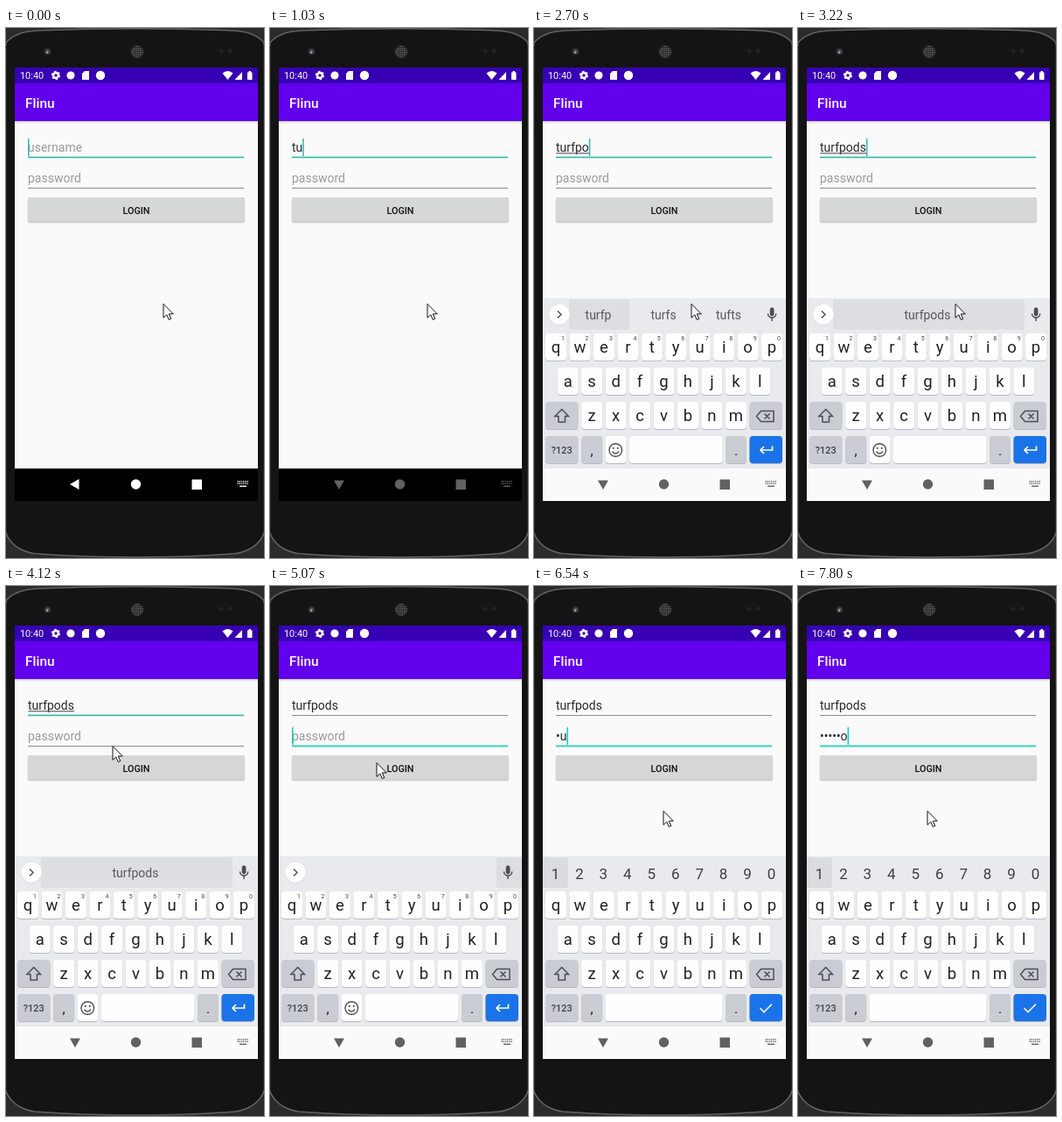
An HTML page for the animation above (8000 ms loop, 295x604 px).

```html
<!DOCTYPE html>
<html lang="en">
<head>
<meta charset="utf-8">
<title>Login form</title>
<style>
  html, body { margin: 0; width: 100%; height: 100%; overflow: hidden; background: #2b2b2b; }
  svg { display: block; width: 100vw; height: 100vh; font-family: Roboto, sans-serif; }
</style>
</head>
<body>
<svg viewBox="0 0 295 604"><g id="phone"></g><g id="screen"></g></svg>
<script>
const LOOP = 8000, NAME = 'turfpods';
const PITCH = 27.45, KEY = '#fefefe', SIDE = '#c9cdd3', ICON = '#4c5055', INK = '#202124';
const measure = document.createElement('canvas').getContext('2d');
measure.font = '14px Roboto, sans-serif';
const widthOf = s => measure.measureText(s).width;

const rect = (x, y, w, h, fill, r = 0) =>
  `<rect x="${x}" y="${y}" width="${w}" height="${h}" rx="${r}" fill="${fill}"/>`;
const circle = (x, y, r, fill, extra = '') =>
  `<circle cx="${x}" cy="${y}" r="${r}" fill="${fill}" ${extra}/>`;
const fillPath = (d, fill) => `<path d="${d}" fill="${fill}"/>`;
const line = (d, color = ICON, w = 1.5) =>
  `<path d="${d}" fill="none" stroke="${color}" stroke-width="${w}"/>`;
const text = (x, y, s, size, fill = INK, extra = '') =>
  `<text x="${x}" y="${y}" font-size="${size}" fill="${fill}" ${extra}>${s}</text>`;
const centered = (x, y, s, size, fill, weight = 400) =>
  text(x, y, s, size, fill, `text-anchor="middle" font-weight="${weight}"`);
const gear = (x, y, r, color) =>
  circle(x, y, r * .58, 'none', `stroke="${color}" stroke-width="${r * .5}"`) +
  circle(x, y, r * .88, 'none', `stroke="${color}" stroke-width="${r * .3}" stroke-dasharray="${r * .46}"`);

// Value of the last [time, value] pair already reached.
const at = (t, steps) => steps.reduce((v, [time, next]) => t >= time ? next : v, steps[0][1]);

function phone() {
  let mesh = '';
  for (let y = -6; y <= 6; y += 2.4)
    for (let x = -6; x <= 6; x += 2.4)
      if (x * x + y * y < 44) mesh += circle(150 + x, 27 + y, .75, '#6a6a6a');
  return `<path d="M0 17Q9 5 34 3Q90 .8 148 .8Q206 .8 261 3Q286 5 295 17V576Q287 595 262 599Q210 603 148 603Q85 603 33 599Q8 595 0 576Z"
      fill="#141414" stroke="#626262" stroke-width="1.6"/>` +
    line('M.5 20V574M294.5 20V574', '#262626', 1) +
    circle(47.5, 27, 4, '#2c2e31') + circle(47.5, 27, 2.2, '#565b63') + circle(47, 28, 1, '#b4bac6') +
    circle(150, 27, 7.4, '#2b2b2b') + mesh +
    circle(246, 26, 2.6, '#202020') + circle(256, 26, 2.6, '#202020') +
    rect(10, 45, 278, 18.5, '#3700b3') + rect(10, 63, 278, 43, '#6200ee') +
    text(16, 58, '10:40', 10.9, '#fff') +
    gear(57, 54, 5, '#fff') + circle(74, 54, 4.6, '#fff') +
    fillPath('M90 49H95V59H87V52Z', '#fff') + circle(108, 54, 5.2, '#fff') +
    fillPath('M247.5 51.5Q253.500 46.500 259.500 51.500L253.500 59Z', '#fff') +
    fillPath('M270 50V59H261.500Z', '#fff') +
    fillPath('M276 50.500H277.500V49H280V50.500H281.500V59H276Z', '#fff') +
    text(22, 91, 'Flinu', 15.5, '#fff', 'font-weight="500"');
}

function field(y, value, hint, focused, caret, accent, underline) {
  const end = 25 + widthOf(value);
  return text(25, y + 15, value || hint, 14, value ? '#2a2a2a' : '#9b9b9b') +
    (underline ? rect(25.5, y + 16.3, end - 25.5, 1, '#444') : '') +
    (caret ? rect(end, y, 1.5, 20, accent) : '') +
    (focused ? rect(25, y + 20.6, 247, 1.6, accent) : rect(25, y + 21, 247, 1, '#8d8d8d'));
}

function form(t) {
  const name = NAME.slice(0, at(t, [[0, 0], [150, 1], [1030, 2], [1280, 4], [2020, 5], [2460, 6], [2960, 7], [3220, 8]]));
  const count = at(t, [[0, 0], [5710, 1], [6540, 2], [6910, 3], [7050, 4], [7420, 5], [7800, 6]]);
  const pass = count ? '•'.repeat(count - 1) + NAME[count - 1] : '';
  const second = t >= 4660;
  const caret = at(t, [[0, 1], [640, 0], [880, 1], [3730, 0], [4260, 1], [5200, 0], [5710, 1], [6390, 0], [6540, 1]]);
  return rect(10, 106, 278, 396, '#fafafa') +
    rect(10, 106, 278, 1, '#cfcfcf') + rect(10, 107, 278, 1, '#e6e6e6') + rect(10, 108, 278, 1, '#f2f2f2') +
    field(126, name, 'username', !second, caret && !second, '#2fb9ae', t >= 1710 && !second) +
    field(161, pass, 'password', second, caret && second, '#03d2c6') +
    rect(24.5, 193.500, 249, 29, '#e2e2e2', 2) + rect(25, 194, 247.500, 27.500, '#c6c7c7', 2) +
    rect(25, 193, 247.500, 27.500, '#d6d7d7', 2) +
    centered(149, 211.500, 'LOGIN', 10.8, '#111', 500);
}

function navBar(t) {
  const color = at(t, [[0, '#fff'], [640, '#cacaca'], [760, '#969696'], [880, '#616161']]);
  const turn = at(t, [[0, 0], [150, -45], [270, -90]]);
  let dots = '';
  for (let i = 0; i < 12; i++)
    dots += rect(264.500 + i % 6 * 2.2, 516 + (i / 6 | 0) * 2.4, 1.3, 1.4, color);
  return rect(10, 502, 278, 37, t < 1280 ? '#000' : '#fafafa') +
    `<path d="M73 520L83.500 514V526Z" fill="${color}" transform="rotate(${turn} 79 520)"/>` +
    circle(148.500, 520, 5.7, color) + rect(212.500, 514.500, 11.500, 11.500, color, .6) +
    dots + rect(267, 521.500, 8, 1.4, color);
}

const key = (x, y, w, fill = KEY) => rect(x, y + 1, w, 31, '#b6b9be', 4) + rect(x, y, w, 31, fill, 4);
const keyRow = (letters, x, y) => [...letters].map((c, i) =>
  key(x + i * PITCH, y, 24) + centered(x + 12 + i * PITCH, y + 22, c, 18.5)).join('');
const digits = (x, y, size, color) => [...'1234567890'].map((c, i) =>
  centered(x + i * PITCH, y, c, size, color)).join('');

const mic = () => rect(269.7, 318.500, 4.8, 10, ICON, 2.4) + line('M267.500 325.500A4.6 4.6 0 0 0 276.700 325.500M272.100 330V334');

function toolbar(opacity) {
  return `<g opacity="${opacity}">` +
    line('M59 322a1.500 1.500 0 0 1 1.500 -1.500H69.500a1.500 1.500 0 0 1 1.500 1.500V328L67 332.500H60.500a1.500 1.500 0 0 1 -1.500 -1.500ZM62 327.500Q64.500 331 67 327.500') +
    circle(62.700, 324.500, 1, ICON) + circle(67.300, 324.500, 1, ICON) +
    centered(104, 330.500, 'GIF', 11, ICON, 900) +
    line('M139 321.500H148.500V333H139ZM141 325.500H146.500M141 328H146.500M141 330.500H145') + rect(141, 319.500, 5.500, 3, ICON) +
    gear(183, 326.500, 6, ICON) + rect(207, 319, 1, 15, '#d2d5d9') +
    [227.500, 232.500, 237.500].map(x => circle(x, 327, 1.600, ICON)).join('') + '</g>';
}

function suggestions(t) {
  const words = at(t, [
    [2580, ['turfp', 'turfs', 'tufts']],
    [2820, ['turfpo', NAME, 'turfs']],
    [3220, ['', NAME, '']],
    [4930, ['', '', '']]]);
  const shade = t >= 4930 ? [259, 29] : t >= 3220 ? [40, 219] : [40, 69];
  return rect(shade[0], 309.500, shade[1], 34.500, '#dcdee1') +
    words.map((w, i) => centered(73.500 + i * 74.500, 332, w, 14, '#55595e')).join('');
}

function strip(t, secret) {
  if (secret) return rect(10, 309.500, 28.500, 34.500, '#dadce0') + digits(24.500, 333.500, 17, '#3b3e43');
  const open = t < 2340;
  return (t < 2580 ? toolbar(at(t, [[0, 1], [2340, .6], [2460, .25]])) : suggestions(t)) +
    circle(29, 327.300, 11.500, '#cfd2d6') + circle(29, 326.500, 11.500, '#fff') +
    line(open ? 'M31 322.500L27 326.500L31 330.500' : 'M27 322.500L31 326.500L27 330.500') + mic();
}

function keyboard(t) {
  if (t < 1280) return '';
  const secret = t >= 5200;
  return rect(10, 308, 278, 194, '#e8eaed') + strip(t, secret) +
    keyRow('qwertyuiop', 13, 348) + keyRow('asdfghjkl', 26.700, 387) + keyRow('zxcvbnm', 54.200, 426) +
    (secret ? '' : digits(33, 356, 7, '#44474b')) +
    key(13, 426, 37.500, SIDE) + line('M31.800 434.500L39.500 442.500H35.500V449H28V442.500H24Z') +
    key(246.500, 426, 37.500, SIDE) + line('M259.500 436.500H274V448.500H259.500L254.500 442.500ZM263.500 439.500L269.500 445.500M269.500 439.500L263.500 445.500') +
    key(13, 465, 37.500, SIDE) + centered(31.800, 485, '?123', 11, '#3c4043', 500) +
    key(54.200, 465, 24, SIDE) + centered(66.200, 487, ',', 16) +
    (secret ? key(81.500, 465, 134) : key(81.600, 465, 24) + key(109, 465, 106.500) +
      line('M86 481a7.300 7.300 0 1 1 14.600 0a7.300 7.300 0 1 1 -14.600 0M89.500 482.500Q93.300 487.500 97.100 482.500', ICON, 1.4) +
      circle(90.800, 478.800, 1.1, ICON) + circle(95.800, 478.800, 1.1, ICON)) +
    key(219, 465, 24, SIDE) + centered(231, 487, '.', 16) +
    key(246.500, 465, 37.500, '#1a73e8') +
    line(secret ? 'M258.500 481L263 485.500L272 476.500' : 'M272.500 476.500V481H259M263 477L259 481L263 485', '#fff', 1.7);
}

function pointer(t) {
  const [x, y] = at(t, [
    [0, [180, 314]], [3870, [166, 268]], [4000, [138, 212]], [4120, [122, 182]], [4260, [122, 172]],
    [5070, [122, 201]], [5200, [131, 222]], [5310, [142, 245]], [5430, [148, 256]]]);
  return `<path transform="translate(${x} ${y})" d="M0 .5V16.300L3.800 12.800L6.300 18.500L8.800 17.400L6.300 11.900H11.300Z"
    fill="#fff" stroke="#111" stroke-width="1"/>`;
}

document.getElementById('phone').innerHTML = phone();
const screenGroup = document.getElementById('screen');
let shown = '';
function draw(now) {
  const t = now % LOOP;
  const markup = form(t) + keyboard(t) + navBar(t) + pointer(t);
  if (markup !== shown) screenGroup.innerHTML = shown = markup;
  requestAnimationFrame(draw);
}
draw(performance.now());
</script>
</body>
</html>
```
